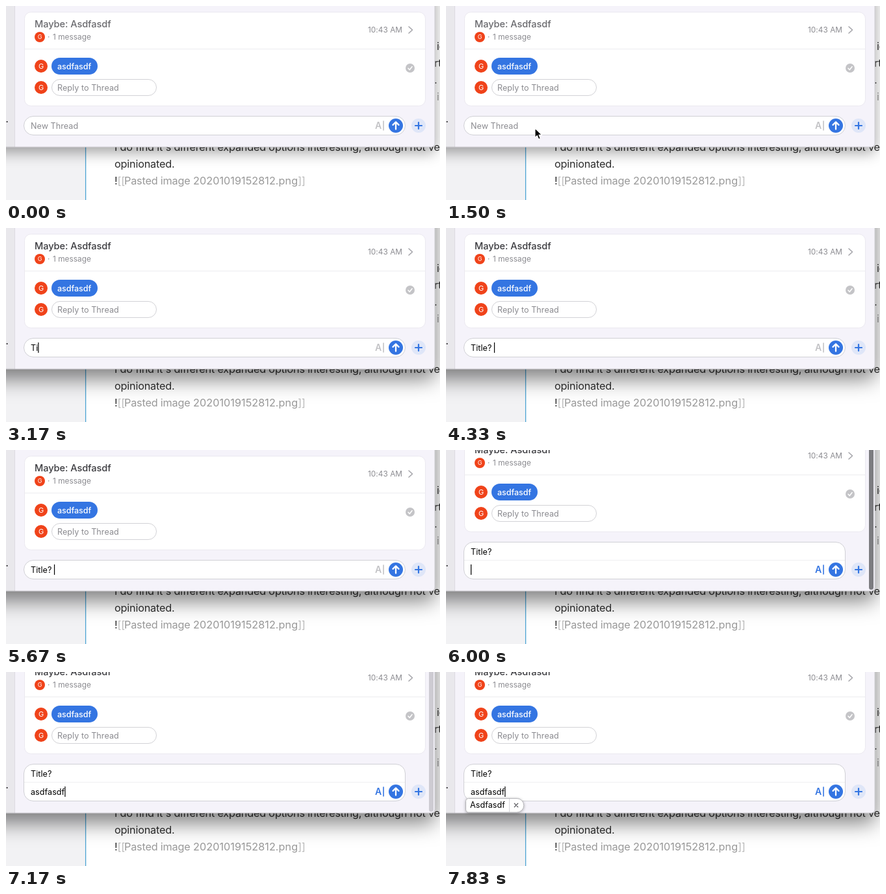
Animation, 668 px wide and 300 px high, one loop 8000 ms. Source, as an HTML page:

```html
<!DOCTYPE html>
<html lang="en">
<head>
<meta charset="utf-8">
<title>New thread</title>
<style>
  html, body { margin: 0; width: 100%; height: 100%; overflow: hidden; background: #fff; }
  svg { display: block; width: 668px; height: 300px; }
  text { font: 12.6px Inter, Roboto, sans-serif; letter-spacing: .04px; white-space: pre; }
  .doc { font-size: 16.3px; letter-spacing: -.22px; fill: #2e2e2e; }
  .doc .dim { fill: #999; }
  .doc .mark { fill: #bbb; }
  .hint { fill: #8b8b90; }
  .small { font-size: 11.8px; letter-spacing: .05px; }
  .initial { font-size: 11px; letter-spacing: 0; fill: #fff; text-anchor: middle; }
  .line { fill: none; stroke-linecap: round; stroke-linejoin: round; }
  #frame { filter: drop-shadow(0 8px 11px rgba(0, 0, 0, .36)); }
  .active #frame { filter: drop-shadow(0 15px 16px rgba(0, 0, 0, .5)); }
  #subject { font-size: 14.6px; font-weight: 500; letter-spacing: -.08px; fill: #6a6a6e; }
  .active #subject { fill: #3c3c40; }
  #format { fill: #c2c2c5; stroke: #c2c2c5; }
  .open #format { fill: #3475e2; stroke: #3475e2; }
</style>
</head>
<body>
<svg id="stage" viewBox="0 0 668 300">
  <!-- document behind the window -->
  <path fill="#f2f2f4" d="M0 0h122v300H0z"/>
  <path stroke="#4ba3d3" stroke-width="1.3" d="M122.6 0v300"/>
  <text class="doc" x="663" y="68">ideas</text>
  <text class="doc" x="659" y="94">rt of</text>
  <text class="doc" x="659" y="120">. [</text>
  <g class="doc">
    <text class="doc" x="663" y="146"><tspan class="dim">in</tspan></text>
    <text class="doc" x="167" y="224">I do find it's different expanded options interesting, although not very</text>
    <text class="doc" x="167" y="250">opinionated.</text>
    <text class="doc" x="167" y="276">!<tspan class="mark">[[</tspan><tspan class="dim" x="182">Pasted image</tspan><tspan class="dim" x="288" style="letter-spacing:0">20201019152812.png<tspan class="mark">]]</tspan></tspan></text>
  </g>

  <!-- mail window -->
  <rect id="frame" x="-100" y="-100" width="760.5" height="318.5" rx="6" fill="#f5f3fa"/>
  <path fill="#e9e8ec" d="M0 0h13v218H0z"/>
  <path stroke="#dddbe1" d="M13.5 0v218"/>
  <path class="line" stroke="#000" stroke-opacity=".16" d="M0 218H654.5a5.5 5.5 0 0 0 5.5-5.5V0"/>
  <text x="-.5" y="180" style="font-size:15px">.</text>

  <g id="card">
    <rect x="28.5" y="9.5" width="617" height="145" rx="10" fill="#fff" stroke="#ebe9f0"/>
    <path stroke="#ececef" d="M29 66.5h616"/>
    <text id="subject" x="44" y="33">Maybe: Asdfasdf</text>
    <circle cx="52" cy="48" r="8" fill="#f0431a"/>
    <text class="initial" x="52" y="51.3" style="font-size:9px">G</text>
    <text class="hint small" x="64" y="52.4">·</text>
    <text class="hint small" x="72" y="52.4">1 message</text>
    <text class="hint small" x="557" y="41.4">10:43 AM</text>
    <path class="line" stroke="#a5a5aa" stroke-width="1.6" d="M620 32l5.5 5-5.5 5"/>
    <circle cx="54" cy="93" r="10" fill="#f0431a"/>
    <text class="initial" x="54" y="97">G</text>
    <rect x="70" y="80" width="71" height="26" rx="13" fill="#3475e2"/>
    <text x="79" y="97.5" fill="#fff" style="font-weight:500;letter-spacing:-.08px">asdfasdf</text>
    <circle cx="622" cy="96" r="7" fill="#c4c4c7"/>
    <path class="line" stroke="#fff" stroke-width="1.5" d="M619 96.3l2.2 2.4 3.8-5"/>
    <circle cx="54" cy="126" r="10" fill="#f0431a"/>
    <text class="initial" x="54" y="130">G</text>
    <rect x="70.5" y="113.5" width="161" height="25" rx="12.5" fill="#fff" stroke="#d2d2d6"/>
    <text class="hint" x="79" y="130.7">Reply to Thread</text>
  </g>

  <!-- composer -->
  <rect id="field" x="27.5" width="587" rx="14.5" fill="#fff" stroke="#d0d0d5"/>
  <path id="rule" stroke="#efeff1" d="M28 170.5h586"/>
  <text id="title" x="38" y="162">Title?</text>
  <text id="typed" x="38" y="190"></text>
  <path id="caret" stroke="#000" stroke-width="1.2" d="M0 177v16"/>
  <g id="format">
    <text x="568" y="190" stroke="none" style="font-size:14px;font-weight:600">A</text>
    <path stroke-width="1.6" d="M581 177.5v15"/>
  </g>
  <circle cx="600" cy="185" r="11" fill="#3475e2"/>
  <path class="line" stroke="#fff" stroke-width="2.3" d="M600 190.5v-11M595.5 183.9l4.5-4.5 4.5 4.5"/>
  <circle cx="635" cy="185" r="11" fill="#dfe6f8"/>
  <path class="line" stroke="#3475e2" stroke-width="2.2" d="M630 185h10M635 180v10"/>
  <rect id="scroll" x="651" y="-20" width="7" height="236" rx="3.5" fill="#7c7c80"/>

  <g id="popup">
    <path fill="#fff" stroke="#b4b4b8" style="filter:drop-shadow(0 1px 2px rgba(0,0,0,.3))" d="M34.5 195.5H109a10.7 10.7 0 0 1 0 21.5H34.5a4 4 0 0 1-4-4V199.5a4 4 0 0 1 4-4z"/>
    <path stroke="#d4d4d8" d="M97.5 196v21"/>
    <text x="37" y="210.4">Asdfasdf</text>
    <path class="line" stroke="#606064" stroke-width="1.3" d="M105.3 203.3l5.4 5.4M110.7 203.3l-5.4 5.4"/>
  </g>

  <path id="arrow" stroke="#fff" stroke-width="1.1" stroke-linejoin="round" d="M0 0v14.4l3.3-3 2.4 5.5 2.6-1.1-2.4-5.4h4.6z"/>
  <g id="beam" class="line">
    <path stroke="#fff" stroke-width="3" d="M-3-8q3 0 3 2.5 0-2.5 3-2.5M0-6V6M-3 8q3 0 3-2.5 0 2.5 3 2.5M-1.5 3h3"/>
    <path stroke="#000" stroke-width="1.4" d="M-3-8q3 0 3 2.5 0-2.5 3-2.5M0-6V6M-3 8q3 0 3-2.5 0 2.5 3 2.5M-1.5 3h3"/>
  </g>
</svg>
<script>
const LOOP = 8000, FPS = 6;
const $ = id => document.getElementById(id);
const show = (id, on) => $(id).style.display = on ? '' : 'none';
const place = (id, x, y) => $(id).setAttribute('transform', `translate(${x} ${y})`);

// Ticks (sixths of a second) at which things happen
const ACTIVATE = 10, FOCUS = 12, OPEN = 36, POPUP = 44;
const titleKeys = [18, 19, 20, 21, 22, 24, 25];
const bodyKeys = [39, 40, 40, 41, 41, 42, 42, 43];
const pointer = { 7: [166, 254], 8: [144, 208], 9: [137, 189] };

const typedBy = (text, keys, tick) => text.slice(0, keys.filter(k => k <= tick).length);

function draw(time) {
  const tick = Math.floor((time + 5) * FPS / 1000);
  const open = tick >= OPEN, active = tick >= ACTIVATE;
  const text = open ? typedBy('asdfasdf', bodyKeys, tick) : typedBy('Title? ', titleKeys, tick);
  const empty = !open && !text;

  $('stage').setAttribute('class', (active ? 'active ' : '') + (open ? 'open' : ''));
  place('card', 0, open ? -28 : 0);
  $('field').setAttribute('y', open ? 142.5 : 170.5);
  $('field').setAttribute('height', open ? 57 : 29);
  show('rule', open);
  show('title', open);

  const typed = $('typed');
  typed.textContent = empty ? 'New Thread' : text;
  typed.setAttribute('class', empty ? 'hint' : '');
  const idle = tick > 25 && !open;
  const lit = !idle || (tick - 26) % 6 < 3;
  show('caret', tick >= FOCUS && lit);
  place('caret', 38.6 + (text ? typed.getComputedTextLength() : 0), 0);

  show('scroll', open && tick < 44);
  $('scroll').setAttribute('opacity', Math.min(1, (44 - tick) / 3));
  show('popup', tick >= POPUP);

  const at = pointer[tick];
  show('arrow', at);
  if (at) place('arrow', ...at);
  show('beam', active && tick < titleKeys[0]);
  place('beam', 133, 174);
}

const start = performance.now();
(function loop() {
  draw((performance.now() - start) % LOOP);
  requestAnimationFrame(loop);
})();
</script>
</body>
</html>
```
